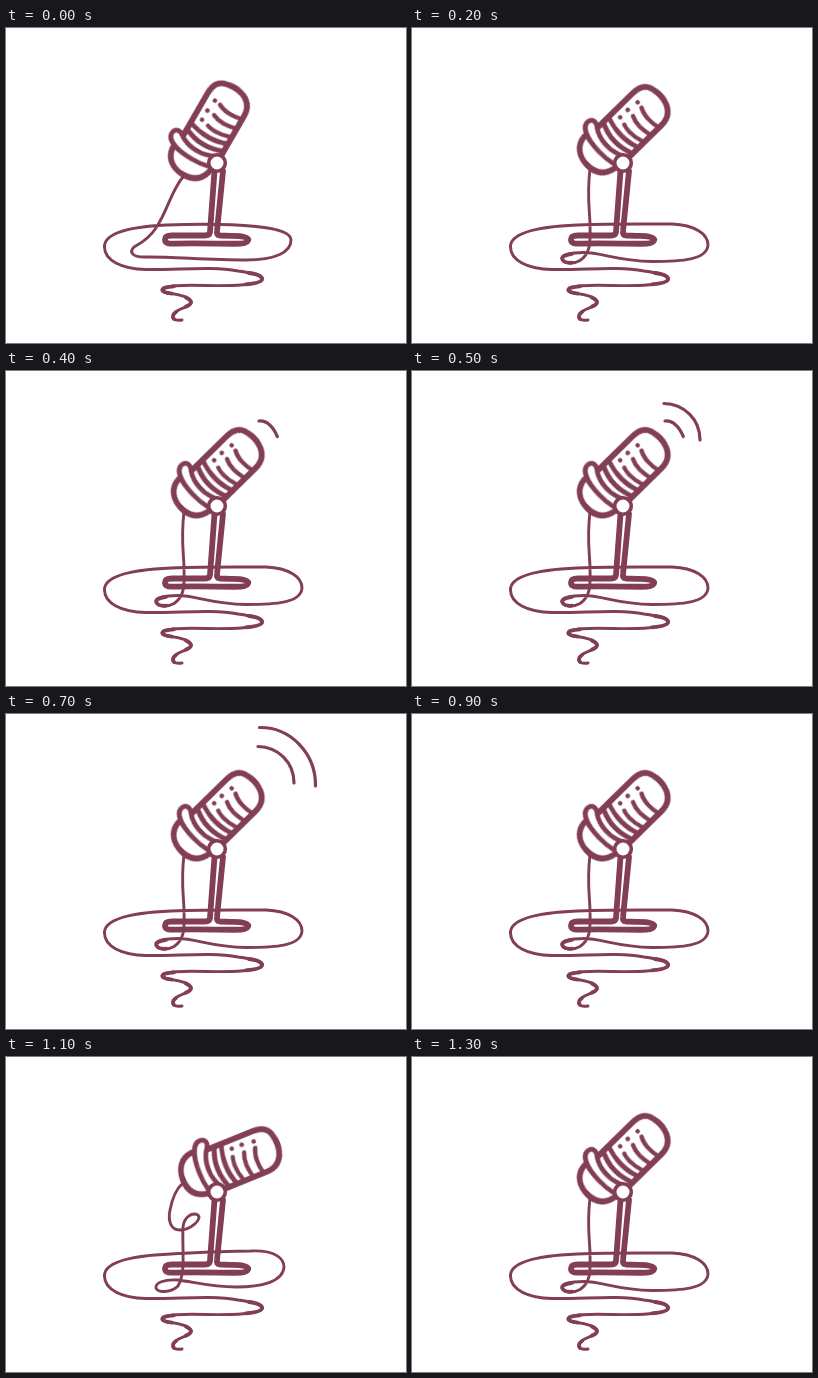
Recreate the animation shown at these times as an HTML page. Size 400 by 315 pixels, loop 1500 ms.

```html
<!DOCTYPE html>
<html lang="en">
<head>
<meta charset="utf-8">
<title>Microphone</title>
<style>
  html, body { margin: 0; width: 100%; height: 100%; overflow: hidden; background: #fff; }
  svg { display: block; width: 100%; height: 100%; }
  path, circle { fill: none; stroke: #823d57; stroke-linecap: round; stroke-linejoin: round; }
  .cord { stroke-width: 2.9; }
  .bend { stroke-width: 3.8; }
  .stand { stroke-width: 5.8; }
  .case { stroke-width: 5.8; }
  .bar { stroke-width: 4.8; }
  .grille { stroke-width: 4.3; }
  .dot { fill: #823d57; stroke: none; }
  .joint { fill: #fff; stroke-width: 3.6; }
  .wave { stroke-width: 3.2; }

  .head, .pose, .wave { animation: 1500ms step-end infinite; }
  .head { animation-name: tilt; }
  .back { animation-name: back; }
  .mid { animation-name: mid; }
  .fore { animation-name: fore; }
  .w1 { animation-name: w1; }
  .w2 { animation-name: w2; }
  .w3 { animation-name: w3; }

  @keyframes tilt {
    0% { transform: rotate(30deg); }
    13.33%, 86.66% { transform: rotate(45.5deg); }
    73.33% { transform: rotate(67.9deg); }
    100% { transform: rotate(45.5deg); }
  }
  @keyframes back {
    0% { visibility: visible; }
    13.33%, 100% { visibility: hidden; }
  }
  @keyframes mid {
    0%, 73.33% { visibility: hidden; }
    13.33%, 86.66%, 100% { visibility: visible; }
  }
  @keyframes fore {
    0%, 86.66%, 100% { visibility: hidden; }
    73.33% { visibility: visible; }
  }
  @keyframes w1 {
    0%, 46.66%, 100% { visibility: hidden; }
    26.66% { visibility: visible; }
  }
  @keyframes w2 {
    0%, 53.33%, 100% { visibility: hidden; }
    33.33% { visibility: visible; }
  }
  @keyframes w3 {
    0%, 60%, 100% { visibility: hidden; }
    40% { visibility: visible; }
  }
</style>
</head>
<body>
<svg viewBox="0 0 400 315">
  <!-- cord: shared tail, then one loop per pose -->
  <path class="cord" d="M98.5 219C98.5 232 115 241 140 241.5C175 242 205 238 232 243C246 245 256.5 247 256.5 251C256.5 257 225 258 200 257.5C180 257 156 257 156 262C156 267 178 264 185 273C188 280 165 280 167 290Q169 293 176 292"/>
  <path class="bend" d="M243 245C250 246 256 248 256 251C256 254 249 255.5 240 256.3M168 258.3C161 259 156 260 156.5 262C157 264 161 265 166 265.6M180 269.5C187 273 186 276 180 278.5M170 284C167 286 166 289 168 291"/>
  <path class="cord pose back" d="M98.5 219C98 206 120 199 160 197C200 195.5 225 196 250 198.5C275 201 285 206 285 212C285 224 270 232 240 232C200 232 165 228.5 138 229C126 229 123 224 128 219C133 216 142 212 150 200C162 182 165 163 177 149"/>
  <g class="pose mid">
    <path class="cord" d="M98.5 219C98 206 120 199 165 197C205 195.5 225 196 260 196C283 197 296 206 296 217C295 232 270 233.5 240 233.5C205 233 190 224.5 172 224.5C158 224.5 149 227 150 231C152 236 162 236 168 232.5C180 224 178 212 178 195C177 175 175 165 178 141"/>
    <path class="bend" d="M160 225.8C152 227 149.5 229 150.5 231.5C152 234.5 156 235 160 234.7"/>
  </g>
  <path class="cord pose fore" d="M98.5 219C98 206 120 199 165 197C200 195 215 194 245 194C270 193 278 202 278 210C277 225 255 230 230 230C205 230 188 225 172 223C158 222 149 226 150 231C152 236 165 236 172 229C180 215 176 195 177 170C178 160 186 155 192 158C196 163 184 173 174 173C164 173 162 163 164 153C166 143 169 133 176 127"/>

  <path class="stand" d="M208.5 143L204 204Q203.5 207.5 199 207.5L166 207.5Q159 207.5 159 211.5Q159 216 166 215.7C190 215 220 216 235 215.7Q242 215 242.3 211.5Q241 207.5 225 207.8L214 207.5Q210.5 207 211 203L217 143"/>

  <g transform="translate(211 135)">
    <g class="head">
      <path class="case" d="M-43-8V-56Q-43-71-31-73Q-22-75-15-73Q0-69 0-54V-8"/>
      <path class="case" d="M-46 9C-45 21-35 27-24 27C-12 27-4 22-2 9"/>
      <path class="bar" d="M-43-14.5Q-22-4.5 0-13.5M-43-22Q-20-14 0-22"/>
      <path class="bar" d="M-5-5C-18 2-34 0-43-6C-49-11-54.5-9-54-2C-52 8-28 12-5 7"/>
      <path class="grille" d="M-26.5-52Q-17-47-2-50M-26.5-40Q-17-35.5-2-39M-26.5-27.7Q-17-24.5-2-29"/>
      <circle class="dot" cx="-33" cy="-53" r="2.3"/>
      <circle class="dot" cx="-34.5" cy="-40.6" r="2.3"/>
      <circle class="dot" cx="-34.6" cy="-30" r="2.3"/>
    </g>
    <circle class="joint" r="8.3"/>
  </g>

  <path class="wave w1" d="M253 50Q264 49 271.3 65.5"/>
  <path class="wave w2" d="M252 32.5C272 33 288 48 288 69"/>
  <path class="wave w3" d="M253.5 13.5C285 13 310 40 309.5 72"/>
</svg>
</body>
</html>
```
